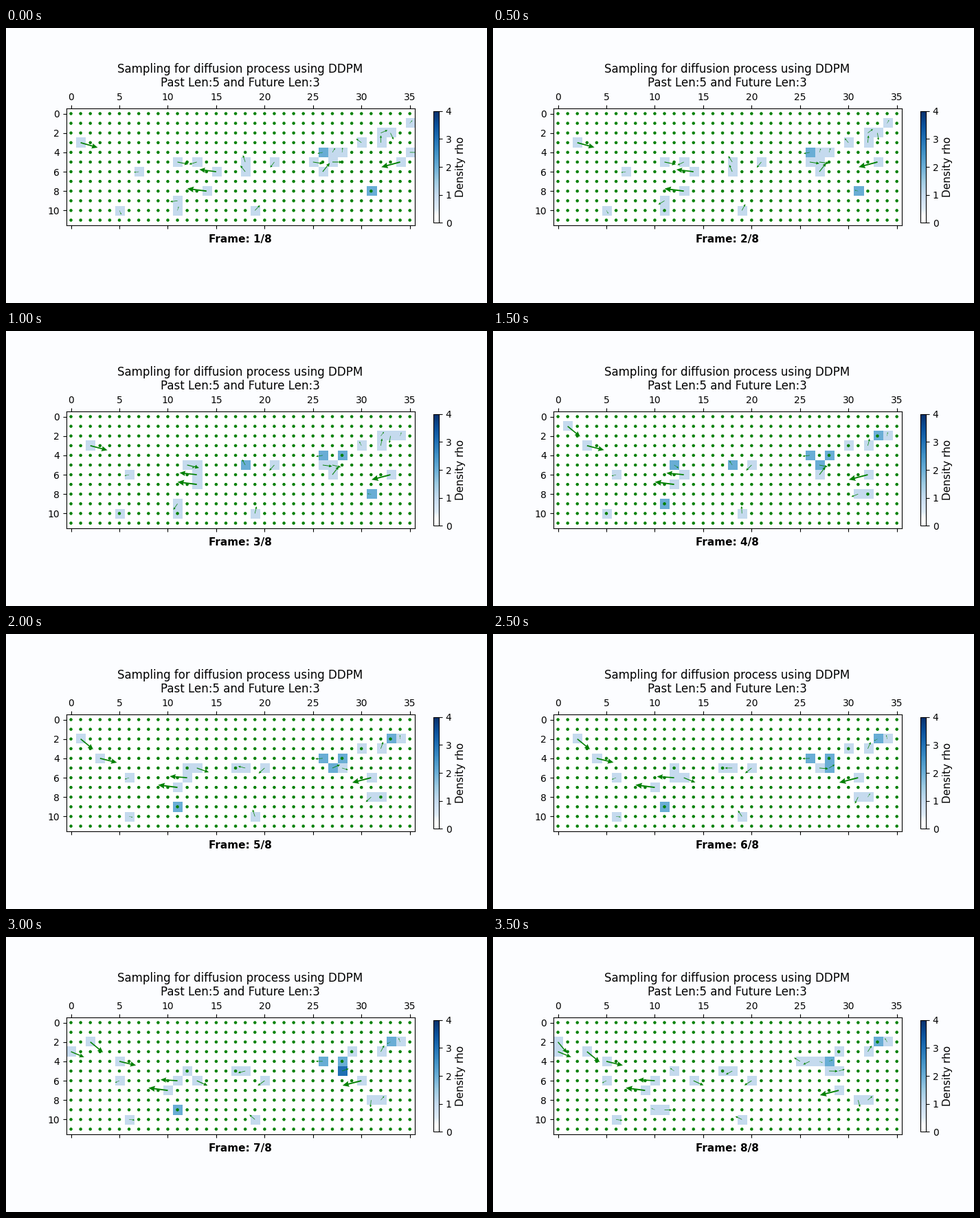
A matplotlib script for the animation above (4 s loop, 700 px wide and 400 px high).

```python
import numpy as np
import matplotlib.pyplot as plt
from matplotlib.animation import FuncAnimation
from matplotlib.colors import LinearSegmentedColormap

plt.rcParams["font.family"] = "DejaVu Sans"

ROWS, COLS = 12, 36
STEPS, STEP_MS = 8, 500
PAPER = "#fcfdff"
ARROW_GAIN = 2.8  # arrow length per cell of drift
SWAY = .75        # arrow length of someone standing still

# Start and drift per step (x, y, vx, vy), optionally the step of arrival
STRIDERS = [
    (1, 2.85, .61, .17), (.9, 1.1, .45, .4, 3), (-2.9, 1.7, .45, .2),
    (-2.4, -.7, .3, .4), (14.7, 6, -.62, -.06), (13.9, 7.6, -.7, -.1),
    (34.1, 5.3, -.68, .18), (11, 4.9, .4, .13), (25.4, 5, .38, 0),
    (26.3, 6.35, .28, -.27), (26.6, 5, .28, 0), (35.4, 4, .3, -.07),
]
STROLLERS = [
    (6.9, 5.9, -.25, .08), (4.9, 9.55, .18, .13), (11, 9.95, -.08, -.17),
    (13, 5, -.2, 0), (17.8, 5.6, -.1, -.1), (21, 5, -.18, .09),
    (26, 4, -.075, 0), (27.3, 4, .13, 0), (28, 4, -.075, 0),
    (30.2, 3, -.13, 0), (31.1, 8, .15, 0), (32.1, 2, .14, 0),
    (34.5, 1.4, -.03, .06),
]
STANDING = [(11, 9), (18, 5), (19, 10), (26, 4), (31, 8), (33, 2), (32, 3)]


class Walker:
    def __init__(self, rng, x, y, vx=0, vy=0, born=0):
        self.start = np.array([x, y])
        self.drift = np.array([vx, vy])
        self.born = born
        self.heading = rng.uniform(0, 2 * np.pi)
        self.turn = rng.uniform(-.6, .6)

    def cell(self, step):
        x, y = self.start + self.drift * (step - self.born)
        return int(np.floor(y + .5)), int(np.floor(x + .5))

    def arrow(self, step):
        """Drift plus a slowly turning sway that fades with speed."""
        angle = self.heading + self.turn * step
        sway = SWAY * np.exp(-4 * np.hypot(*self.drift))
        turning = sway * np.array([np.cos(angle), np.sin(angle)])
        return ARROW_GAIN * self.drift + turning


rng = np.random.default_rng(3)
walkers = [Walker(rng, *w) for w in STRIDERS + STROLLERS + STANDING]


def fields(step):
    """Density and mean arrow on the grid at one step."""
    rho, u, v = np.zeros((3, ROWS, COLS))
    for walker in walkers:
        row, col = walker.cell(step)
        inside = 0 <= row < ROWS and 0 <= col < COLS
        if step < walker.born or not inside:
            continue
        du, dv = walker.arrow(step)
        rho[row, col] += 1
        u[row, col] += du
        v[row, col] += dv
    count = np.maximum(rho, 1)
    return rho, u / count, v / count


# Blues with a pure white low end
blues = plt.get_cmap("Blues")
stops = [(0, "white"), (.06, "white")]
stops += [(s, blues(s)) for s in np.linspace(.125, 1, 15)]
cmap = LinearSegmentedColormap.from_list("density", stops)

fig, ax = plt.subplots(figsize=(7, 4), dpi=100, facecolor=PAPER)
rho, u, v = fields(0)
image = ax.matshow(rho, cmap=cmap, vmin=0, vmax=4)
bar = fig.colorbar(image, ax=ax, fraction=.015, pad=.05, ticks=range(5))
bar.set_label("Density rho", fontsize=11)

# Cells without movement show as dots
gx, gy = np.meshgrid(np.arange(COLS), np.arange(ROWS))
arrows = ax.quiver(gx, gy, u, v, color="g", angles="xy", scale_units="xy",
                   scale=1, width=.0098, minshaft=3, headwidth=4.5)
ax.set_xlim(-.5, COLS - .5)
ax.set_ylim(ROWS - .5, -.5)
ax.set_title("Sampling for diffusion process using DDPM\n"
             "Past Len:5 and Future Len:3", fontsize=12)
counter = ax.text(.5, -.15, "", transform=ax.transAxes, ha="center",
                  fontsize=11, fontweight="bold")


def draw(step):
    rho, u, v = fields(step)
    image.set_data(rho)
    arrows.set_UVC(u, v)
    counter.set_text(f"Frame: {step + 1}/{STEPS}")
    return image, arrows, counter


anim = FuncAnimation(fig, draw, frames=STEPS, interval=STEP_MS,
                     repeat=True, repeat_delay=0)
plt.show()
```
